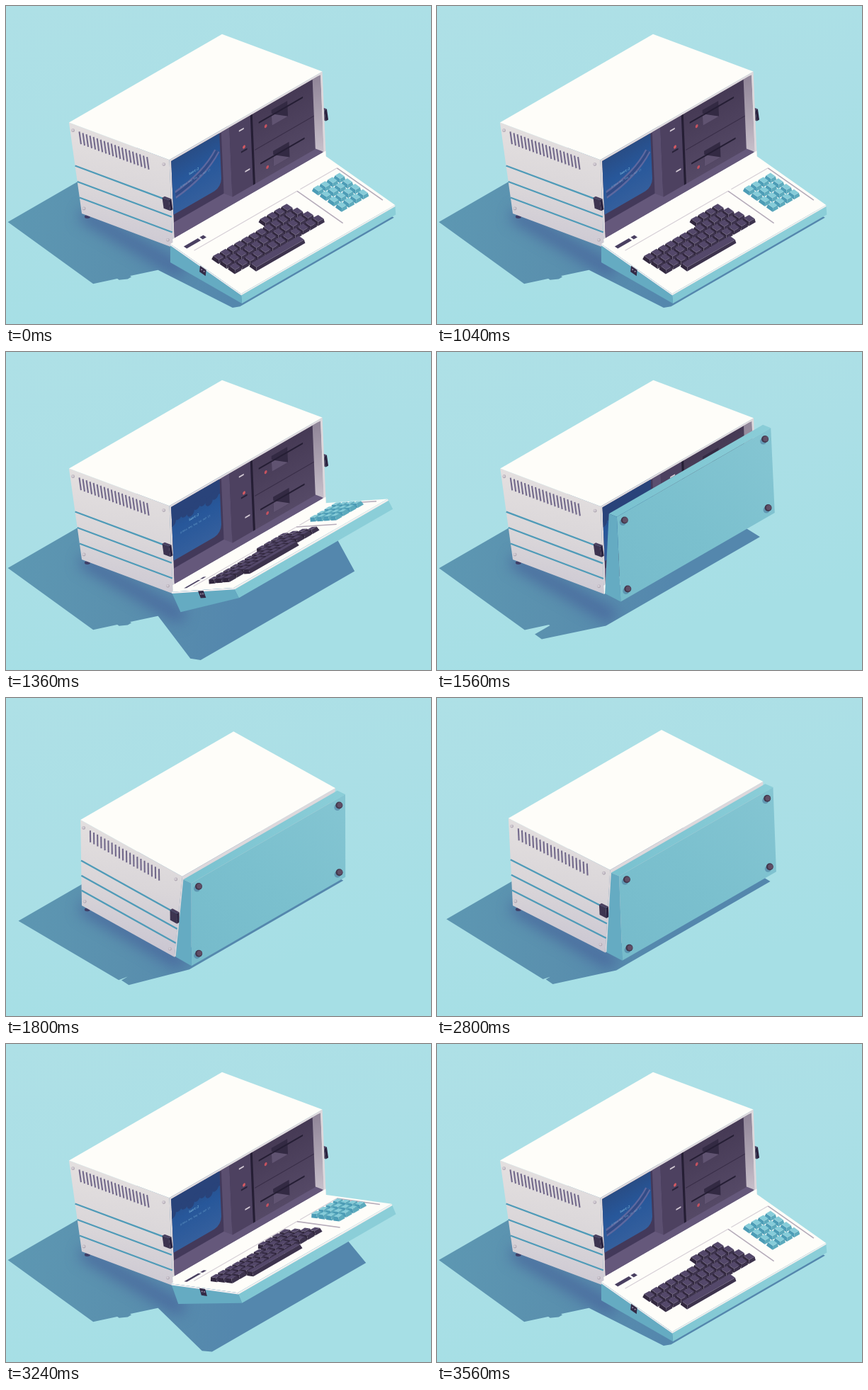
An HTML page with a canvas that plays this animation: 600x449 px, repeating every 4.16 s.

```html
<!DOCTYPE html>
<html lang="en">
<head>
<meta charset="utf-8">
<title>Folding portable computer</title>
<style>
  html, body { margin: 0; width: 100%; height: 100%; overflow: hidden; background: #abdfe6; }
  canvas { display: block; width: 100vw; height: 100vh; }
</style>
</head>
<body>
<canvas id="stage" width="600" height="449"></canvas>
<script>
const ctx = document.getElementById('stage').getContext('2d');
const RAD = Math.PI / 180, STEPS = 20, STEP_MS = 40, LOOP_MS = 4160;
const CASE_WIDTH = 249.5, LID_WIDTH = 251, HEIGHT = 120;
const INK = '#4a4061', WHITE = '#fefdf9';
let tilt, lidAngle, opened;

// World axes: x along the width, y towards the front, z up.
const project = ([x, y, z]) => [107 + .866 * (x + y), 293 + .5 * (y - x) - z];
const castShadow = ([x, y, z]) => project([x - .612 * z, y - .232 * z, 0]);
const rotate = (y, z, a) =>
  [y * Math.cos(a) - z * Math.sin(a), y * Math.sin(a) + z * Math.cos(a)];
const body = (x, y, z) => [x, ...rotate(y, z, tilt)];
// The slanted front: v runs down from its top edge, depth goes into the case.
const front = (x, v, depth = 0) => body(x, 166 - v / 8 - depth, HEIGHT - v);
// The lid: u runs from the hinge to the free edge, h rises from the inner face.
const lid = (x, u, h = 0) => {
  const [py, pz] = rotate(151, 5, tilt);
  const [dy, dz] = rotate(u - 3.35, h - 2.5, lidAngle);
  return [x, py + dy, pz + dz];
};

const clamp = v => Math.max(0, Math.min(1, v));
const easeOut = v => 1 - (1 - clamp(v)) ** 2;
const range = n => [...Array(n).keys()];

function trace(points) {
  points.forEach((p, i) => i ? ctx.lineTo(...p) : ctx.moveTo(...p));
  ctx.closePath();
}
function face(color, ...points) {
  ctx.beginPath();
  trace(points.map(project));
  ctx.fillStyle = color;
  ctx.fill();
}
function edge(color, width, a, b) {
  ctx.beginPath();
  ctx.moveTo(...project(a));
  ctx.lineTo(...project(b));
  ctx.strokeStyle = color;
  ctx.lineWidth = width;
  ctx.stroke();
}
function dot(color, [x, y], r, ry = r) {
  ctx.beginPath();
  ctx.ellipse(x, y, r, ry, 0, 0, 7);
  ctx.fillStyle = color;
  ctx.fill();
}
function box(color, x, y, w, h) {
  ctx.fillStyle = color;
  ctx.fillRect(x, y, w, h);
}
function gradient(x0, y0, x1, y1, ...colors) {
  const g = ctx.createLinearGradient(x0, y0, x1, y1);
  colors.forEach((c, i) => g.addColorStop(i / (colors.length - 1), c));
  return g;
}
function cross(o, a, b) {
  return (a[0] - o[0]) * (b[1] - o[1]) - (a[1] - o[1]) * (b[0] - o[0]);
}
function facesCamera(quad) {
  const [a, b, , d] = quad.map(project);
  return cross(a, b, d) < 0;
}
function hull(points) {
  const sorted = [...points].sort((a, b) => a[0] - b[0] || a[1] - b[1]);
  const half = list => {
    const out = [];
    for (const p of list) {
      while (out.length > 1 && cross(out.at(-2), out.at(-1), p) <= 0) out.pop();
      out.push(p);
    }
    return out.slice(0, -1);
  };
  return [...half(sorted), ...half(sorted.reverse())];
}

const BODY_PROFILE = [[0, 0], [0, HEIGHT], [166, HEIGHT], [151, 0]];
const LID_PROFILE = [[0, 0], [116.2, 0], [118.8, -12.75], [2.8, -25.65]];
const LATCH_PROFILE = [[149, 53], [149, 67], [160, 67], [160, 53]];
const side = (space, profile, x) => profile.map(([a, b]) => space(x, a, b));
const prism = (space, profile, x0, x1) =>
  [...side(space, profile, x0), ...side(space, profile, x1)];

function drawShadow() {
  ctx.beginPath();
  for (const solid of [
    prism(body, BODY_PROFILE, 0, CASE_WIDTH),
    prism(lid, LID_PROFILE, 0, LID_WIDTH),
    prism(body, LATCH_PROFILE, -6, 0)
  ]) trace(hull(solid.map(castShadow)));
  ctx.fillStyle = gradient(10, 300, 330, 350, '#5d97b2', '#5a90ae', '#5487ad');
  ctx.fill();
  // Deeper tone where the case meets the ground.
  ctx.save();
  ctx.clip();
  ctx.filter = 'blur(10px)';
  edge('rgba(66,88,150,.65)', 20, body(0, 0, 0), [0, 165, 0]);
  ctx.restore();
}

function drawLatch(x) {
  const near = side(body, LATCH_PROFILE, x), far = side(body, LATCH_PROFILE, x + 4);
  face('#3d3450', ...near);
  face('#2b2440', near[3], near[2], far[2], far[3]);
  face('#4b405f', near[1], near[2], far[2], far[1]);
}

function drawCase() {
  drawLatch(CASE_WIDTH);
  dot('#3f3f68', project(body(0, 9, -1.5)), 4, 2.5);
  const left = side(body, BODY_PROFILE, 0), right = side(body, BODY_PROFILE, CASE_WIDTH);
  face(gradient(150, 180, 125, 340, '#e3dfdf', '#dad6d9', '#cbc7d2'), ...left);
  face(WHITE, left[1], left[2], right[2], right[1]);
  face('#ddd8dc', left[2], left[3], right[3], right[2]);

  for (const i of range(3)) {
    const z = 63 - 21 * i;
    edge('#4f9bb8', 2.3, body(0, 0, z), body(0, 151 + z / 8, z));
  }
  for (const i of range(20)) {
    const y = 15.7 + 5.9 * i;
    edge('#72698b', 2.1, body(0, y, 112.5), body(0, y, 96));
  }
  for (const z of [8, 111]) for (const y of [5, 143 + z / 9]) {
    const [sx, sy] = project(body(0, y, z));
    dot('#b0a8b3', [sx, sy], 2.4);
    dot('#d3cdd4', [sx - .4, sy - .4], 1.7);
  }
}

// Runs paint() with x and v of the front plane, at a given depth, as canvas axes.
function onPlane(depth, paint) {
  const [o, a, b] = [front(0, 0, depth), front(1, 0, depth), front(0, 1, depth)].map(project);
  ctx.save();
  ctx.transform(a[0] - o[0], a[1] - o[1], b[0] - o[0], b[1] - o[1], ...o);
  paint();
  ctx.restore();
}

function drawScreen() {
  ctx.beginPath();
  ctx.roundRect(-20, -20, 128, 118, 12);
  ctx.fillStyle = gradient(0, 15, 0, 98, '#294a80', '#27579a', '#345f9d');
  ctx.fill();
  ctx.clip();

  const reflection = clamp((opened - .88) * 10);
  ctx.globalAlpha = 1 - reflection;
  box('#29437a', 0, 0, 110, 44);
  for (const i of range(9)) dot('#29437a', [20 + 10 * i, 43 + 3 * Math.sin(i * 2)], 6);
  ctx.globalAlpha = reflection;
  for (const [color, width] of [['#5d689f', 11], ['#314c88', 5]]) {
    ctx.beginPath();
    ctx.moveTo(34, 73);
    ctx.quadraticCurveTo(82, 68, 103, 46);
    ctx.strokeStyle = color;
    ctx.lineWidth = width;
    ctx.stroke();
  }

  ctx.globalAlpha = .8;
  ctx.fillStyle = '#85bfe0';
  ctx.textAlign = 'center';
  ctx.font = 'bold 4.5px "DejaVu Sans Mono", monospace';
  ctx.fillText('boot:2', 65, 57);
  ctx.font = '3.5px "DejaVu Sans Mono", monospace';
  ctx.fillText('press any key to run it', 67, 67);
}

function drawControls() {
  box('#4d4160', 111, 0, 36, 109);
  for (const [x, v] of [[126, 25], [133, 84]]) box('#d5ccd6', x, v, 8, 2);
  box('#29233a', 128, 55, 10, 2);
  dot('#d65a62', [133, 51], 2.2);
}

function drawDrives() {
  box(gradient(0, 15, 0, 109, '#463a55', '#554966'), 147, 0, 100, 109);
  box('#251e34', 145, 0, 3.5, 109);
  box('#392e48', 150, 63, 97, 1.2);
  for (const v of [30, 86]) {
    box('#332a43', 179, v - 7, 26, 21);
    ctx.beginPath();
    trace([[179, v - 2], [205, v + 14], [179, v + 14]]);
    ctx.fillStyle = '#605371';
    ctx.fill();
    box('#251e34', 158, v - 1, 72, 2.2);
    dot('#c5525f', [169, v + 10], 2.2);
  }
}

function drawInterior() {
  const X0 = 3, X1 = CASE_WIDTH - 3, TOP = 3, FLOOR = 108.5, SHALLOW = 14, DEEP = 28;
  ctx.save();
  ctx.beginPath();
  trace([front(X0, TOP), front(X1, TOP), front(X1, FLOOR), front(X0, FLOOR)].map(project));
  ctx.clip();
  onPlane(DEEP, () => box('#43395a', -30, -30, 300, 160));
  face('#65587b', front(X0 - 20, FLOOR, DEEP), front(X1, FLOOR, DEEP), front(X1, FLOOR), front(X0, FLOOR));
  onPlane(DEEP, drawScreen);
  face('#5b4f70', front(111, 0, DEEP), front(111, 0, SHALLOW), front(111, FLOOR, SHALLOW), front(111, FLOOR, DEEP));
  onPlane(SHALLOW, () => { drawControls(); drawDrives(); });
  face(gradient(435, 105, 447, 212, '#92879a', '#aea4b2', '#cbc3ce'),
    front(X1, 0, SHALLOW), front(X1, 0), front(X1, FLOOR), front(X1, FLOOR, SHALLOW));
  ctx.restore();
  face(WHITE, front(0, FLOOR), front(CASE_WIDTH, FLOOR), front(CASE_WIDTH, HEIGHT), front(0, HEIGHT));
}

function drawKey(x, u, w, d, [top, left, near]) {
  const at = (sx, su, h) => {
    const inset = h ? 1.1 : 0;
    return lid(x + sx * (w / 2 - inset), u + su * (d / 2 - inset), h);
  };
  const H = 5;
  face(left, at(-1, -1, 0), at(-1, -1, H), at(-1, 1, H), at(-1, 1, 0));
  face(near, at(-1, 1, 0), at(-1, 1, H), at(1, 1, H), at(1, 1, 0));
  face(top, at(-1, -1, H), at(1, -1, H), at(1, 1, H), at(-1, 1, H));
}
function drawKeyRow(u, first, last, gap, colors) {
  const gaps = Math.round((last - first) / 11.9), pitch = (last - first) / gaps;
  for (const i of range(gaps + 1)) drawKey(last - i * pitch, u, pitch - gap, 12.4 - gap, colors);
}
function plate(color, x0, x1, u0, u1) {
  face(color, lid(x0, u0), lid(x1, u0), lid(x1, u1), lid(x0, u1));
}

function drawKeyboard() {
  for (const [x0, x1] of [[13, 181], [186, 246]]) {
    edge('#d6cfd6', 1.2, lid(x0, 26), lid(x1, 26));
    edge('#b5abb9', 1.6, lid(x1, 26), lid(x1, 101));
  }
  plate(INK, 9, 32, 13, 18);
  plate(INK, 35, 41, 13, 18);

  const pale = ['#86ccd9', '#4c9cb6', '#5caabd'];
  const dark = ['#54486a', '#32283f', '#3d334d'];
  for (const row of range(4)) {
    drawKeyRow(42 + 12.8 * row, 199, 234, 2.2, pale);
  }
  for (const row of range(4))
    drawKeyRow(43 + 12.5 * row, row ? 22 + row : 112, 147 + 4.5 * row, 1.2, dark);
  drawKey(82, 93, 80, 11, dark);
}

function drawLid() {
  const left = side(lid, LID_PROFILE, 0), right = side(lid, LID_PROFILE, LID_WIDTH);
  const colors = [
    WHITE,
    gradient(262, 0, 480, 0, '#7ac2d0', '#8bced8'),
    gradient(262, 370, 478, 140, '#76bbcb', '#7bc0ce', '#84c5d2'),
    '#4f86ad'
  ];
  const [inner, , outer] = colors.map((color, i) => {
    const j = (i + 1) % 4, quad = [left[i], left[j], right[j], right[i]];
    const visible = facesCamera(quad);
    if (visible) face(color, ...quad);
    return visible;
  });
  face('#65abc2', ...left);

  if (inner) {
    face('#f1eef0', lid(0, 0), lid(0, 116.2), lid(0, 116.6, -2), lid(0, 0, -2));
    face('#f3f0ef', lid(0, 116.2), lid(LID_WIDTH, 116.2), lid(LID_WIDTH, 116.6, -2), lid(0, 116.6, -2));
    drawKeyboard();
    face('#332a46', lid(0, 49, -1), lid(0, 59, -1), lid(0, 59, -10), lid(0, 49, -10));
    for (const u of [52, 56]) dot('#9b92ac', project(lid(0, u, -5)), 1);
  }
  if (outer) for (const x of [12, 241]) for (const k of [.09, .9]) {
    const [sx, sy] = project(lid(x, 118.8 - 116 * k, -12.75 - 12.9 * k));
    dot('rgba(66,110,150,.5)', [sx - 2.5, sy + 3], 4.5);
    dot('#41364c', [sx, sy], 5);
    dot('#604f66', [sx + .8, sy - .3], 3.6);
  }
}

// Closing and opening run through the same poses, one per step.
function stepAt(t) {
  if (t < 1040) return STEPS;
  if (t < 1800) return STEPS - 1 - Math.floor((t - 1040) / STEP_MS);
  if (t < 2800) return 0;
  return Math.min(STEPS, 1 + Math.floor((t - 2800) / STEP_MS));
}

function draw(t) {
  const step = stepAt(t);
  opened = easeOut((step - 5.6) / 13.4);
  tilt = (1 + 9 * easeOut(step / 7)) * RAD;
  lidAngle = tilt + (-16.2 + 99 * (1 - opened)) * RAD;

  box(gradient(0, 0, 120, 449, '#aee0e6', '#abdfe6', '#a6dfe5'), 0, 0, 600, 449);
  drawShadow();
  drawCase();
  if (opened) drawInterior();
  drawLatch(-4);
  drawLid();
}

function frame(now) {
  draw(now % LOOP_MS);
  requestAnimationFrame(frame);
}
requestAnimationFrame(frame);
</script>
</body>
</html>
```
